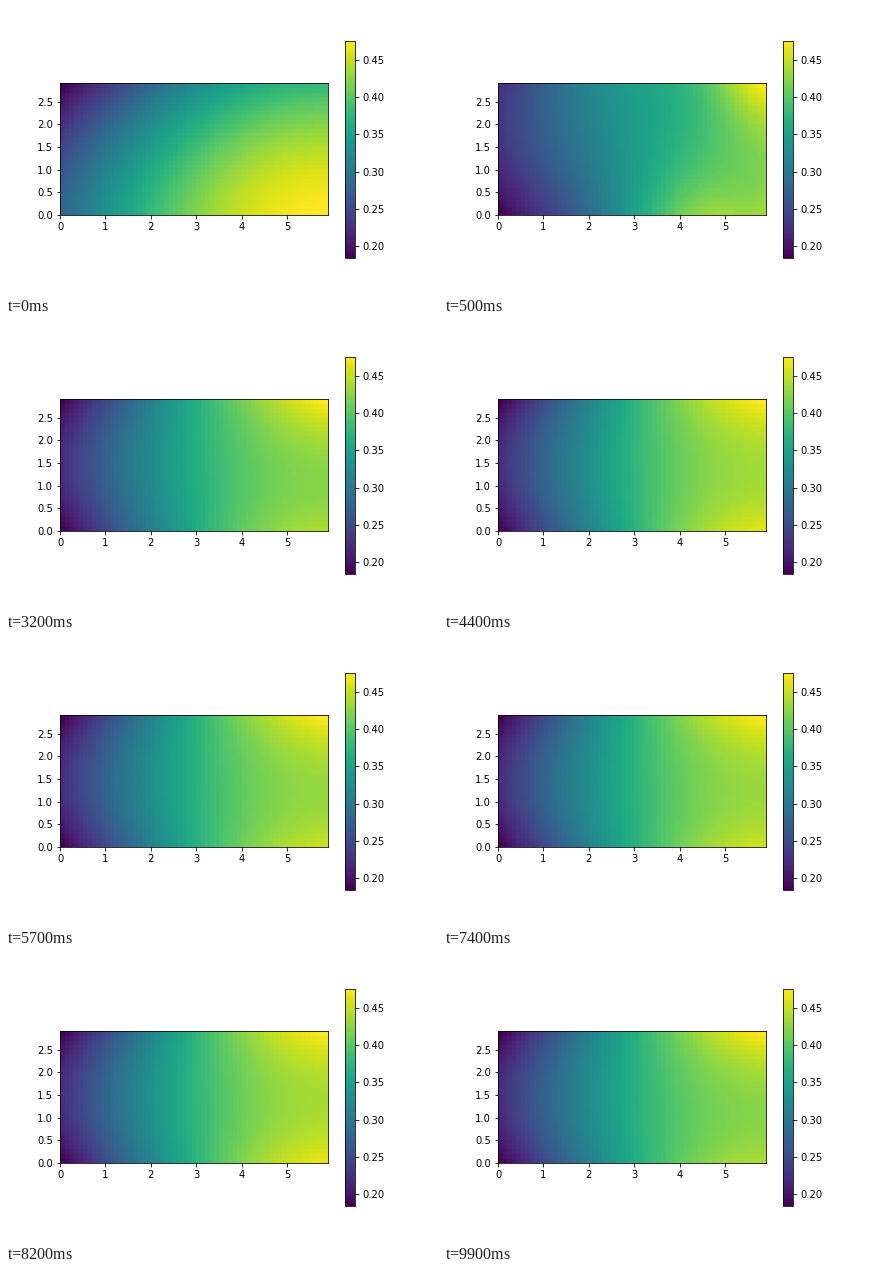
These frames come from a looping animation (432x288 px, 10000 ms). A matplotlib script:

```python
import numpy as np
import matplotlib.pyplot as plt
from matplotlib.animation import FuncAnimation

plt.rcParams["figure.subplot.bottom"] = 0.125

FRAMES = 100
WARM_UP = 5    # frames from the first guess to the early state
SETTLE = 9     # decay time of the early state, in frames
SWAY = 34      # period of the slow vertical sway, in frames
LOW, HIGH = 0.1839, 0.4760

xs = np.arange(60) / 10
ys = np.arange(30) / 10
X, Y = np.meshgrid((xs[:-1] + 0.05) / xs[-1], (ys[:-1] + 0.05) / ys[-1])
V = 2 * Y - 1                   # -1 at the bottom edge, 1 at the top
RISE = np.sin(np.pi * X / 2)

GUESS = 0.33 + 0.67 * RISE - 0.33 * Y**1.6
EARLY = (0.14 + 0.66 * (0.4 * RISE + 0.6 * X)
         + (0.2 * X - 0.08) * V**2
         + 0.07 * np.cos(2 * np.pi * X**2) * V)


def settled(i):
    tilt = 0.04 + 0.025 * np.cos(2 * np.pi * (i - 31) / SWAY)
    return (0.15 + 0.69 * RISE
            + (0.26 * X - 0.14) * V**2
            + tilt * X**3 * V)


def mix(a, b, u):
    return a + (b - a) * u


def surface(i):
    if i < WARM_UP:
        z = mix(GUESS, EARLY, i / WARM_UP)
    else:
        z = mix(settled(i), EARLY, np.exp((WARM_UP - i) / SETTLE))
    z = (z - z.min()) / (z.max() - z.min())
    return mix(LOW, HIGH, z)


fig, ax = plt.subplots(figsize=(6, 4), dpi=72)
mesh = ax.pcolormesh(xs, ys, surface(0), cmap="viridis", vmin=LOW, vmax=HIGH)
ax.set_aspect("equal")
fig.colorbar(mesh, ax=ax)


def update(i):
    mesh.set_array(surface(i))
    return [mesh]


anim = FuncAnimation(fig, update, frames=FRAMES, interval=100,
                     repeat=True, repeat_delay=0)
plt.show()
```
